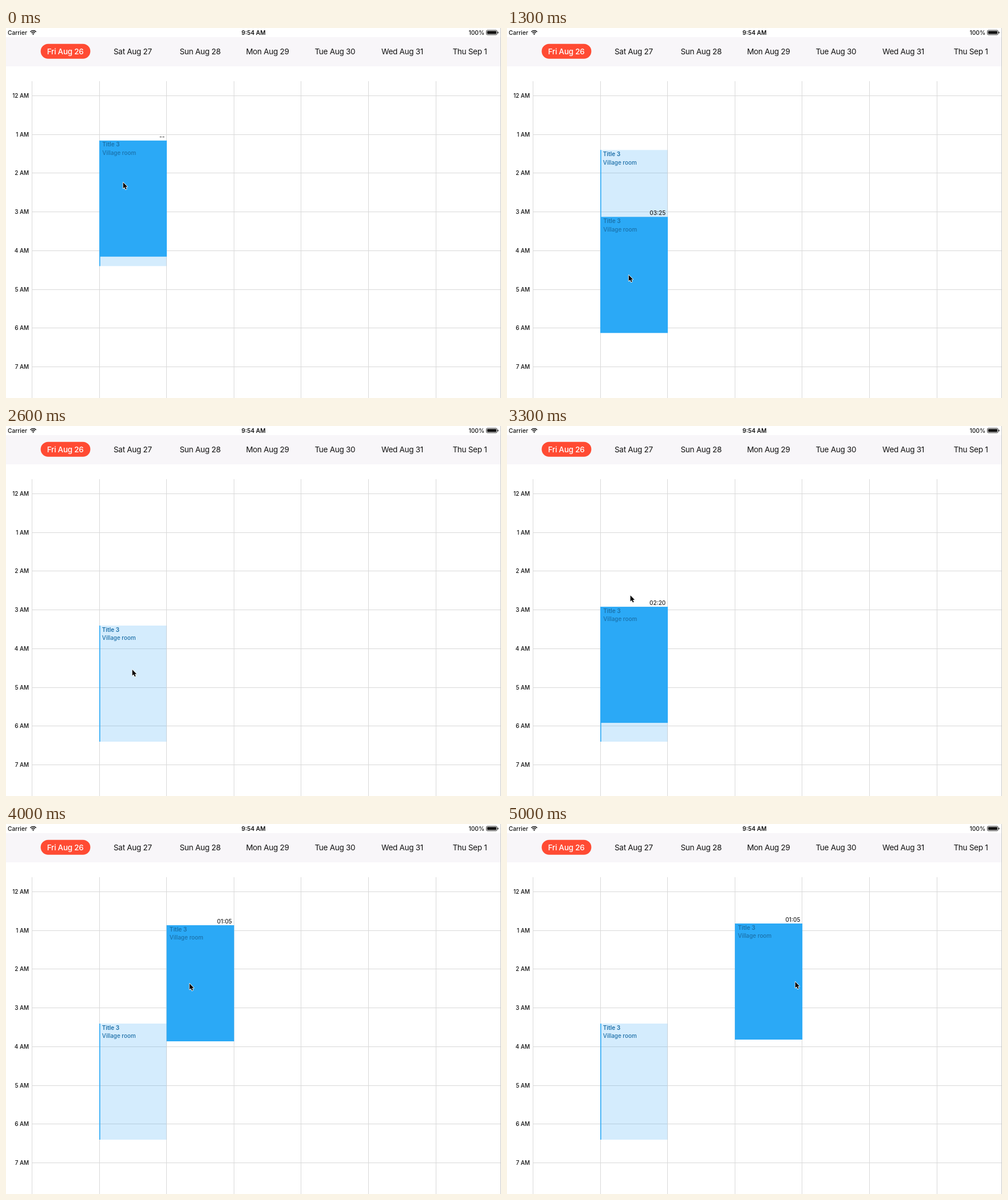
These frames come from a looping animation (865 px wide and 647 px high, 5.1 s). An HTML page with a canvas:

```html
<!DOCTYPE html>
<html lang="en">
<head>
<meta charset="utf-8">
<title>Week calendar</title>
<style>
  html, body { margin: 0; width: 100%; height: 100%; overflow: hidden; background: #fff; }
  canvas { display: block; width: 865px; height: 647px; }
</style>
</head>
<body>
<canvas id="stage"></canvas>
<script>
const W = 865, H = 647, LOOP = 5100, STEP = 100;
const HOUR = 67.75, MIDNIGHT = 117.9, DAY = 117.6, LEFT = 45;
const EVENT_H = 203, LIFT = 17, LEAD = 150;
const DROP = 1600, GRAB = 2900;
const BLUE = '#2ba9f6', LINE = '#d9d9d9';
const days = ['Fri Aug 26', 'Sat Aug 27', 'Sun Aug 28', 'Mon Aug 29', 'Tue Aug 30', 'Wed Aug 31', 'Thu Sep 1'];

const canvas = document.getElementById('stage');
const ctx = canvas.getContext('2d');
const ratio = window.devicePixelRatio || 1;
canvas.width = W * ratio;
canvas.height = H * ratio;

// Smooth shift by `amount` between two times
function glide(t, from, to, amount) {
  const p = Math.min(1, Math.max(0, (t - from) / (to - from)));
  return amount * p * p * (3 - 2 * p);
}

const pointerX = t => 204 + glide(t, 0, 1300, 8) + glide(t, 1900, 2300, 8)
  + glide(t, 3070, 3375, -6) + glide(t, 3400, 4000, 106) + glide(t, 4350, 5000, 183);

const pointerY = t => 269 + glide(t, 100, 900, 162) + glide(t, 1900, 2300, -6)
  + glide(t, 3070, 3375, -153) + glide(t, 3700, 4000, 6) + glide(t, 4400, 4900, -3);

const blockTop = t => t < DROP
  ? 196.8 + glide(t, 240, 1240, 133.5)
  : 332 + glide(t, 3195, 3733, -160) + glide(t, 3800, 4000, 5) + glide(t, 4400, 4900, -3);

function rect(x, y, w, h, color) {
  ctx.fillStyle = color;
  ctx.fillRect(x, y, w, h);
}

function pill(x, y, w, h, r, color) {
  ctx.beginPath();
  ctx.roundRect(x, y, w, h, r);
  ctx.fillStyle = color;
  ctx.fill();
}

// y is the middle of the capitals
function text(str, x, y, size, { weight = 500, color = '#111', align = 'left', spacing = 0 } = {}) {
  ctx.font = `${weight} ${size}px Inter, Roboto, sans-serif`;
  ctx.letterSpacing = spacing + 'px';
  ctx.textAlign = align;
  ctx.fillStyle = color;
  ctx.fillText(str, x, y + size * 0.36);
}

function statusBar() {
  text('Carrier', 3, 8, 10.2);
  text('9:54 AM', 432.5, 8, 10.2, { weight: 600, align: 'center' });
  text('100%', 836, 8, 10.2, { align: 'right' });

  ctx.strokeStyle = '#111';
  ctx.lineWidth = 1.5;
  for (const r of [4.2, 7]) {
    ctx.beginPath();
    ctx.arc(47.5, 11.5, r, -Math.PI * 0.76, -Math.PI * 0.24);
    ctx.stroke();
  }
  ctx.beginPath();
  ctx.moveTo(47.5, 12);
  ctx.arc(47.5, 11.5, 2.2, -Math.PI * 0.78, -Math.PI * 0.22);
  ctx.fillStyle = '#111';
  ctx.fill();

  ctx.lineWidth = 0.8;
  ctx.beginPath();
  ctx.roundRect(839.4, 3.9, 18.8, 8, 2);
  ctx.stroke();
  pill(840.7, 5.2, 16.2, 5.4, 1, '#111');
  pill(859, 6.4, 1.4, 3, 0.6, '#111');
}

function header() {
  rect(0, 16, W, 51, '#f8f6f9');
  pill(60.6, 27.8, 86.8, 26, 13, '#ff4b33');
  days.forEach((day, i) => text(day, 103.6 + i * 117.8, 41, 13.5, {
    weight: i ? 400 : 500,
    color: i ? '#111' : '#fff',
    align: 'center',
    spacing: -0.28
  }));
}

function grid() {
  for (let i = 0; i < 7; i++) rect(Math.round(LEFT + i * DAY), 93, 1, H - 93, LINE);
  for (let h = 0; h < 8; h++) {
    const y = Math.round(MIDNIGHT + h * HOUR);
    rect(LEFT, y, W - LEFT, 1, LINE);
    text(`${h || 12} AM`, 40, y, 9.9, { align: 'right' });
  }
  rect(W - 1, 0, 1, H, '#c8c8c8');
}

function details(x, y, color) {
  text('Title 3', x, y + 7, 10.1, { weight: 600, color });
  text('Village room', x, y + 21.7, 9.9, { color });
}

function savedEvent(y) {
  rect(163, y, 117.5, EVENT_H, 'rgba(43,160,246,0.2)');
  rect(163, y, 1.6, EVENT_H, BLUE);
  details(167.7, y, '#1c6fa8');
}

// Time of day at height y, to the nearest five minutes
function clock(y) {
  const mins = Math.round((y - MIDNIGHT) / HOUR * 12) * 5;
  const two = n => String(n).padStart(2, '0');
  return two(Math.floor(mins / 60)) + ':' + two(mins % 60);
}

// The block snaps to the pointer's day; its label runs ahead of it
function dragged(t, idle) {
  const x = LEFT + Math.floor((pointerX(t) - LEFT) / DAY) * DAY + 0.4;
  const y = blockTop(t);
  const label = idle ? '--' : clock(blockTop(t + LEAD) + LIFT);
  rect(x, y, 118, EVENT_H, BLUE);
  details(x + 5.2, y, '#1b71aa');
  text(label, x + 114.3, y - 6.7, 10, { color: '#222', align: 'right' });
}

function arrow(x, y) {
  const shape = [[0, 0], [0, 12], [2.8, 9.5], [4.8, 14], [6.8, 13.1], [4.9, 8.8], [8.5, 8.8]];
  const scale = 0.88;
  ctx.beginPath();
  shape.forEach(([dx, dy]) => ctx.lineTo(x + 0.7 + dx * scale, y + 1 + dy * scale));
  ctx.closePath();
  ctx.lineJoin = 'round';
  ctx.lineWidth = 1.6;
  ctx.strokeStyle = '#fff';
  ctx.stroke();
  ctx.fillStyle = '#000';
  ctx.fill();
}

function draw(t) {
  ctx.setTransform(ratio, 0, 0, ratio, 0, 0);
  rect(0, 0, W, H, '#fff');
  statusBar();
  header();
  grid();
  savedEvent(t < DROP ? 213.3 : 349);
  if (t < DROP) dragged(t, t < 300);
  else if (t >= GRAB) dragged(t, t < GRAB + 300);
  arrow(pointerX(t), pointerY(t));
}

const start = performance.now();
function tick() {
  const t = (performance.now() - start) % LOOP;
  draw(Math.floor(t / STEP) * STEP);
  requestAnimationFrame(tick);
}
tick();
</script>
</body>
</html>
```
